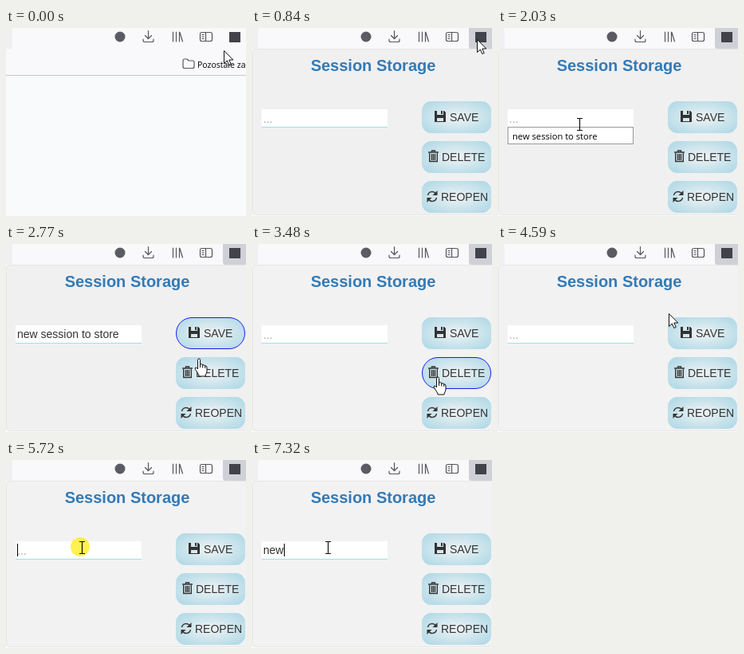
Recreate the animation shown at these times as an HTML page. Size 301 by 236 pixels, loop 7400 ms.

```html
<!DOCTYPE html>
<html lang="en">
<head>
<meta charset="utf-8">
<title>Session Storage popup</title>
<style>
  html, body { margin: 0; width: 100%; height: 100%; overflow: hidden; background: #f8fafc; }
  svg { display: block; width: 100%; height: 100%; }
  text { font: 14px "Liberation Sans", Arial, sans-serif; fill: #333; white-space: pre; }
  .ui { font: 11.2px "Open Sans", "Noto Sans", sans-serif; fill: #000; }
  .title { font-size: 20px; font-weight: bold; fill: #337ab7; text-anchor: middle; }
  .line { fill: none; stroke: #55555d; stroke-width: 1.2; stroke-linecap: round; stroke-linejoin: round; }
  .glyph { fill: #333; }
  .outline { fill: none; stroke: #333; stroke-width: 1.4; }
  .button rect { fill: url(#sheen); stroke: url(#sheen); }
  .button.hover rect { stroke: #1a1aee; rx: 19.5px; }
</style>
</head>
<body>
<svg viewBox="0 0 301 236">
  <defs>
    <radialGradient id="sheen" r=".68">
      <stop stop-color="#f0f3f4"/>
      <stop offset="1" stop-color="#add8e6"/>
    </radialGradient>
  </defs>

  <!-- Browser toolbar -->
  <rect width="301" height="236" fill="#f8fafc"/>
  <rect width="301" height="59" fill="#f9f9fc"/>
  <path d="M0 0H8V24Q8 26 5 26H0Z" fill="#f0f0f2"/>
  <path d="M0 59.5H301" stroke="#c9c9ce"/>
  <rect id="toolButton" x="272" y="-4" width="34" height="30" rx="3" fill="#d0d0d7"/>
  <circle cx="143" cy="11" r="6.5" fill="#5b5b63"/>
  <g class="line">
    <path d="M178.5 3.5V13M174.5 9.5L178.5 13.5L182.5 9.5M172 14V15.5Q172 17.5 174 17.5H183Q185 17.5 185 15.5V14"/>
    <path d="M209.5 5V17M213.5 5V17M217.5 5V17M218 5.5L221.5 17"/>
    <rect x="243.5" y="5.5" width="15" height="11" rx="2"/>
    <path d="M250.5 6V16.5M246 8.5H248M246 11H248M246 13.5H248"/>
    <path d="M222 48.500V41Q222 39 224 39H227L229 41H234Q236 41 236 43V48.500Q236 50.500 234 50.500H224Q222 50.500 222 48.500Z"/>
  </g>
  <rect x="280" y="5" width="14" height="13" fill="#42424a"/>
  <text class="ui" x="240" y="50" style="font-size:10.5px">Pozostałe zakładki</text>

  <!-- Extension popup -->
  <g id="popup">
    <rect id="panel" x=".5" y="26.5" width="304" height="208" rx="4" stroke="#e6e6e9"/>
    <text class="title" x="152" y="54">Session Storage</text>
    <rect x="12" y="102" width="158" height="22" fill="#fff"/>
    <path d="M12 124.5H170" stroke="#a5dce8"/>
    <text id="placeholder" x="14" y="119" style="fill:#aaa">...</text>
    <text id="entry" x="14" y="118"></text>
    <path id="caret" d="M.5 105V121" stroke="#000"/>

    <g class="button">
      <rect x="213.5" y="92.5" width="86" height="39" rx="11"/>
      <path class="glyph" fill-rule="evenodd" d="M229 104H241L243 106V118H229ZM232 104V109H240V104ZM232 113V117H240V113ZM237 104H239V108H237Z"/>
      <text x="248" y="117">SAVE</text>
    </g>
    <g class="button">
      <rect x="213.5" y="142.5" width="86" height="39" rx="11"/>
      <path class="outline" d="M221 156H234M225.5 156V154H229.5V156M222.7 157V167.500H232.300V157M225.500 158V166M227.500 158V166M229.500 158V166"/>
      <text x="238" y="167">DELETE</text>
    </g>
    <g class="button">
      <rect x="213.5" y="192.5" width="86" height="39" rx="11"/>
      <path class="outline" stroke-width="2" d="M220.5 210A5.5 5.5 0 0 1 230.5 208M231.5 213A5.5 5.5 0 0 1 221.5 215"/>
      <path class="glyph" d="M232.5 204V210H226.5ZM219.5 219V213H225.5Z"/>
      <text x="237" y="217">REOPEN</text>
    </g>

    <g id="dropdown">
      <rect x="12.5" y="124.5" width="157" height="21" fill="#fff" stroke="#999"/>
      <text class="ui" x="18" y="140">new session to store</text>
    </g>
  </g>

  <!-- Pointer -->
  <g id="pointer">
    <circle id="click" cx="-2" cy="-1" r="12" fill="#ffee32" fill-opacity=".85"/>
    <path id="arrow" transform="translate(-1)" d="M.5 .5V16.5L4.3 13L6.8 18.5L9.2 17.5L6.8 12H11.8Z" fill="#fff" stroke="#111"/>
    <path id="beam" d="M-3 -7.5H4M.5 -7V7M-3 7.5H4" fill="none" stroke="#111" stroke-width="1.2"/>
    <g id="hand" transform="translate(-1)" stroke="#111">
      <path d="M-1.5 12V1.5a1.5 1.5 0 0 1 3 0V7q3-1 3.2 1q2.8-.6 3 1q2.3-.4 2.3 2v5q-.3 2-2 5v1h-8v-1q-1-2.5-4.5-7.5q-1-2 .5-2.4q1.2-.2 2.5 1.9z" fill="#fff"/>
      <path d="M1.5 7V11M4.7 8V11.5M7.7 9V12" fill="none"/>
    </g>
  </g>
</svg>

<script>
const LOOP = 7400, OPEN = 520, PICK = 2200, CLEAR = 3420, TYPE = 7130;
const PRESS = 150, BLINK = 540, KEY_GAP = 90, HOVER_LAG = 60;
const $ = id => document.getElementById(id);
const buttons = [...document.querySelectorAll(".button")];

const home = { x: 274, y: 28 };
const moves = [
  { start: 40, end: 300, x: 283, y: 14 },     // toolbar button
  { start: 840, end: 1450, x: 95, y: 110 },   // input
  { start: 1880, end: 2160, x: 107, y: 130 }, // suggestion
  { start: 2400, end: 2680, x: 252, y: 120 }, // save
  { start: 2680, end: 2860, x: 234, y: 167 }, // delete
  { start: 4350, end: 4520, x: 215, y: 87 },  // away
  { start: 4600, end: 5600, x: 95, y: 110 }   // input again
];
const clicks = [400, 1450, 1640, 2160, 3110, 5700, 6000];

const between = (t, from, to) => t >= from && t < to;
const clamp = k => Math.min(1, Math.max(0, k));
const ease = k => k * k * (3 - 2 * k);
const inBox = (p, left, top, width, height) =>
  between(p.x, left, left + width) && between(p.y, top, top + height);
const show = (id, on) => { $(id).style.display = on ? "" : "none"; };

function pointerAt(t) {
  return moves.reduce((p, { start, end, x, y }) => {
    const k = ease(clamp((t - start) / (end - start)));
    return { x: p.x + (x - p.x) * k, y: p.y + (y - p.y) * k };
  }, home);
}

function entryAt(t) {
  if (between(t, PICK, CLEAR)) return "new session to store";
  return t < TYPE ? "" : "new".slice(0, 1 + Math.floor((t - TYPE) / KEY_GAP));
}

// The blink restarts whenever the input gains focus or receives a value.
function caretBlinks(t) {
  const since = t < PICK ? clicks[1] : t < CLEAR ? PICK : clicks[5] + PRESS;
  return t >= since && Math.floor((t - since) / BLINK) % 2 === 0;
}

function draw(t) {
  const pointer = pointerAt(t);
  const trailing = pointerAt(t - HOVER_LAG);
  const isOpen = t > OPEN;
  const pressed = clicks.some(at => between(t, at, at + PRESS));

  show("popup", isOpen);
  $("popup").style.opacity = clamp((t - OPEN) / 170);
  $("panel").setAttribute("fill", t < CLEAR ? "#f0f0f0" : "#f2f2f2");
  show("toolButton", isOpen || inBox(pointer, 272, 0, 29, 26));
  $("toolButton").style.opacity = isOpen ? 1 : .6;

  const overButton = (p, i) => isOpen && inBox(p, 213, 92 + 50 * i, 87, 40);
  buttons.forEach((button, i) => button.classList.toggle("hover", overButton(trailing, i)));
  const hand = buttons.some((_, i) => overButton(pointer, i));
  const beam = isOpen && inBox(pointer, 12, 102, 158, 22);

  const text = entryAt(t);
  $("entry").textContent = text;
  show("placeholder", !text);
  show("dropdown", between(t, clicks[2] + PRESS / 2, PICK));
  show("caret", caretBlinks(t) || (beam && pressed));
  const textWidth = text && isOpen ? $("entry").getComputedTextLength() : 0;
  $("caret").setAttribute("transform", `translate(${14 + Math.round(textWidth)})`);

  show("hand", hand);
  show("beam", beam);
  show("arrow", !hand && !beam);
  show("click", pressed);
  $("pointer").setAttribute("transform", `translate(${Math.round(pointer.x)} ${Math.round(pointer.y)})`);
}

const start = performance.now();
function tick() {
  draw((performance.now() - start) % LOOP);
  requestAnimationFrame(tick);
}
tick();
</script>
</body>
</html>
```
